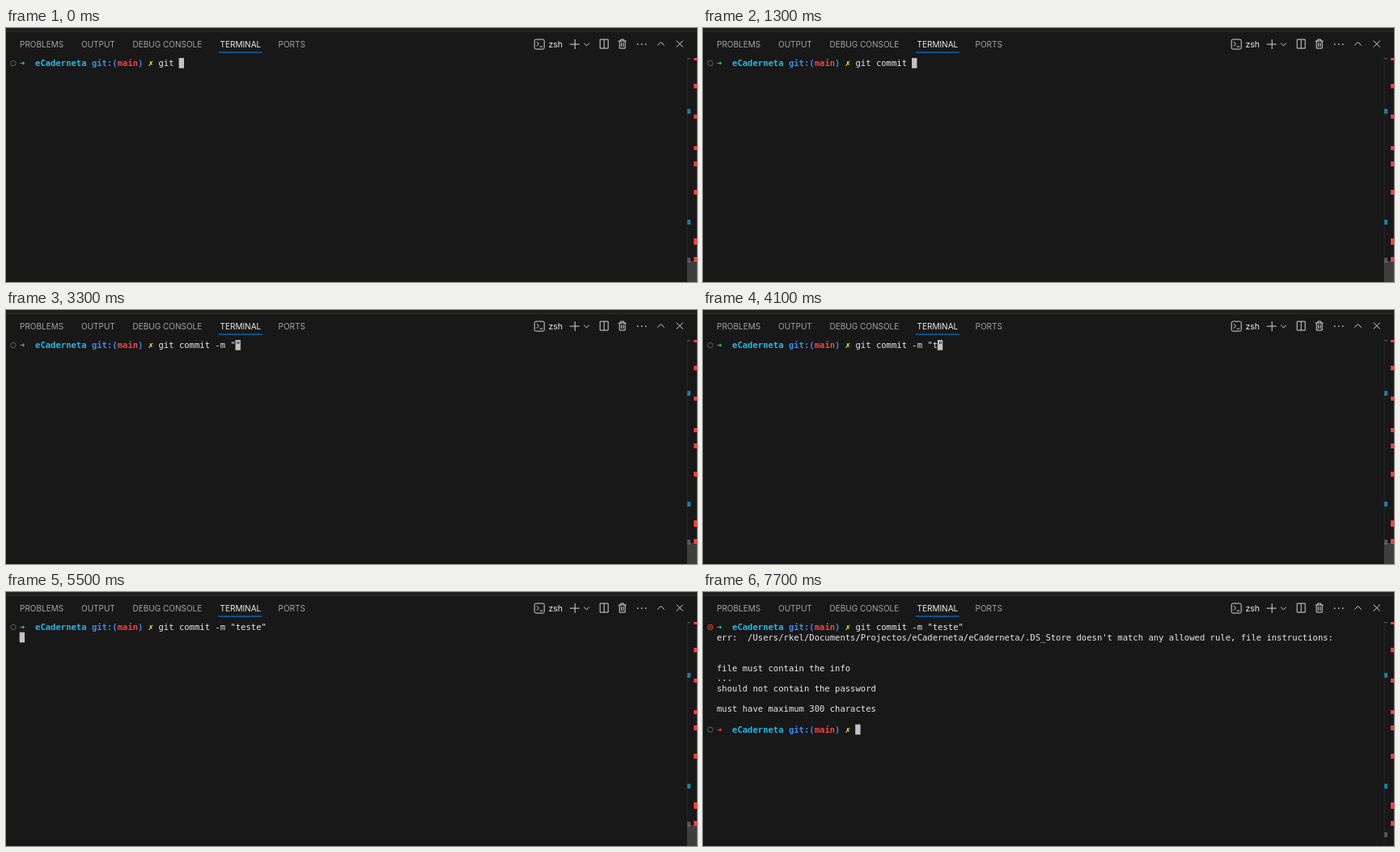
An HTML page that plays this animation: 854 px wide and 314 px high, repeating every 7800 ms.

```html
<!DOCTYPE html>
<html lang="en">
<head>
<meta charset="utf-8">
<title>Terminal commit</title>
<style>
  html, body { margin: 0; width: 100%; height: 100%; overflow: hidden; background: #181818; }
  svg { display: block; }
  text { white-space: pre; }
  .tabs { font: 10px Inter, sans-serif; fill: #a4a4a4; }
  .tabs .on { fill: #ececec; }
  .icons { fill: none; stroke: #d4d4d4; stroke-width: 1; }
  #term { font: 10.55px "DejaVu Sans Mono", monospace; fill: #e8e8e8; }
  .bold { font-weight: bold; }
</style>
</head>
<body>
<svg width="854" height="314" viewBox="0 0 854 314">
  <rect width="854" height="4" fill="#1f1f1f"/>
  <rect y="4" width="854" height="1" fill="#2b2b2b"/>
  <g class="tabs">
    <text x="17" y="24">PROBLEMS</text>
    <text x="93" y="24">OUTPUT</text>
    <text x="156.5" y="24">DEBUG CONSOLE</text>
    <text x="264.5" y="24" class="on">TERMINAL</text>
    <text x="336.5" y="24">PORTS</text>
    <text x="670.5" y="24" class="on" font-size="10.5">zsh</text>
  </g>
  <rect x="262.7" y="29.5" width="54" height="1.2" fill="#0078d4"/>
  <g class="icons" transform="translate(-.3 -.4)">
    <rect x="653.5" y="14.5" width="12" height="12" rx="1.5"/>
    <path d="M656 17.5l3 2.7-3 2.7M660 23.5h3.5"/>
    <path d="M697 20.5h12M703.5 14.5v12M714.5 19l3.3 3.3 3.3-3.3"/>
    <path d="M734.5 14.5h10v11h-10zM739.5 14.5v11"/>
    <path d="M757 16.5h10M760 16.5v-2h4v2M758.5 16.5v9h7v-9M760.8 18.5v5M763.2 18.5v5"/>
    <path d="M805.5 22l4.2-4.2 4.2 4.2M829 16l8 8M837 16l-8 8"/>
    <path d="M781 20.5h0m5 0h0m5 0h0" stroke-width="1.8" stroke-linecap="round"/>
  </g>
  <path d="M842 37v277M853.5 37v277" stroke="#262626"/>
  <g id="marks"></g>
  <rect id="slider" x="842" y="288" width="12" height="26" fill="#797979"/>
  <g id="term"></g>
</svg>
<script>
const LOOP = 7800, CELL = 6.352, ROW = 12.66;
const RED = '#f8413f', BLUE = '#348cf2', CYAN = '#24b7e4', GREEN = '#23d18b', YELLOW = '#faf535';
const COMMAND = 'git commit -m "teste"';
const KEYS = [100, 300, 500, 600, 800, 900, 1300, 1600, 1800, 2200, 2800, 4100, 4200, 4500, 4800, 4900];
const term = document.getElementById('term');
const marks = document.getElementById('marks');
const slider = document.getElementById('slider');

function add(parent, tag, attrs, content = '') {
  const el = document.createElementNS('http://www.w3.org/2000/svg', tag);
  for (const name in attrs) el.setAttribute(name, attrs[name]);
  el.textContent = content;
  return parent.appendChild(el);
}
const colX = col => 17 + col * CELL;
const show = (el, on) => el.setAttribute('visibility', on ? 'visible' : 'hidden');
const write = (parent, col, row, content, attrs) =>
  add(parent, 'text', { x: colX(col), y: 47 + row * ROW, ...attrs }, content);
const mark = (x, y, height, fill) => add(marks, 'rect', { x, y, width: 4, height, fill });
const ring = (parent, y) =>
  add(parent, 'circle', { cx: 9, cy: y, r: 3.2, fill: 'none', stroke: '#606060' });

function prompt(parent, row, arrow) {
  const parts = [[0, '➜', arrow], [3, 'eCaderneta', CYAN], [14, 'git:(', BLUE],
    [19, 'main', RED], [23, ')', BLUE], [25, '✗', YELLOW]];
  for (const [col, content, fill] of parts) write(parent, col, row, content, { fill, class: 'bold' });
}

for (const [y, h] of [[37, 3], [69, 5.5], [107, 5], [146, 5], [165, 6], [200, 6], [260, 8], [283, 6]])
  mark(850, y, h, RED);
mark(842, 100, 6, '#1b7ca2');
mark(842, 237, 6, '#1b7ca2');
mark(842, 37, 1.5, '#4a4a4a');
const promptMark = mark(842, 284, 6, '#555');

prompt(term, 0, GREEN);
const pending = ring(term, 43.5);
const failed = add(term, 'g', { stroke: RED, fill: 'none' });
add(failed, 'circle', { cx: 9, cy: 43.5, r: 3.2 });
add(failed, 'path', { d: 'M7.5 42l3 3M10.5 42l-3 3' });
const typed = write(term, 27, 0, '');

const output = add(term, 'g', {});
const lines = {
  1: "err:  /Users/rkel/Documents/Projectos/eCaderneta/eCaderneta/.DS_Store doesn't match any allowed rule, file instructions:",
  4: 'file must contain the info',
  5: '...',
  6: 'should not contain the password',
  8: 'must have maximum 300 charactes'
};
for (const row in lines) write(output, 0, row, lines[row]);

const nextPrompt = add(term, 'g', {});
prompt(nextPrompt, 10, RED);
ring(nextPrompt, 170.1);

const cursor = add(term, 'rect', { width: 6.4, height: 12.6 });
const under = write(term, 0, 0, '"');

function draw(t) {
  const entered = t >= 5500, printed = t >= 5600, done = t >= 5700;
  const count = 4 + KEYS.filter(key => t >= key).length;
  const opening = t >= 2600 && t < 2800;
  typed.textContent = entered ? COMMAND : COMMAND.slice(0, count);

  const col = done ? 27 : entered ? 0 : 27 + count;
  const row = done ? 10 : printed ? 9 : entered ? 1 : 0;
  cursor.setAttribute('x', colX(col) - 0.3);
  cursor.setAttribute('y', 37.1 + row * ROW);
  cursor.setAttribute('fill', opening ? '#000' : '#c2c2c2');
  under.setAttribute('x', colX(col));
  under.setAttribute('fill', opening ? '#fff' : '#181818');
  show(under, opening || (t >= 3300 && !entered));

  show(output, printed);
  show(nextPrompt, done);
  show(failed, done);
  show(pending, !done);
  promptMark.setAttribute('y', done ? 297 : 284);
  slider.setAttribute('opacity', 0.4 * Math.min(1, Math.max(0, (7700 - t) / 700)));
}

function tick() {
  draw(performance.now() % LOOP);
  requestAnimationFrame(tick);
}
tick();
</script>
</body>
</html>
```
